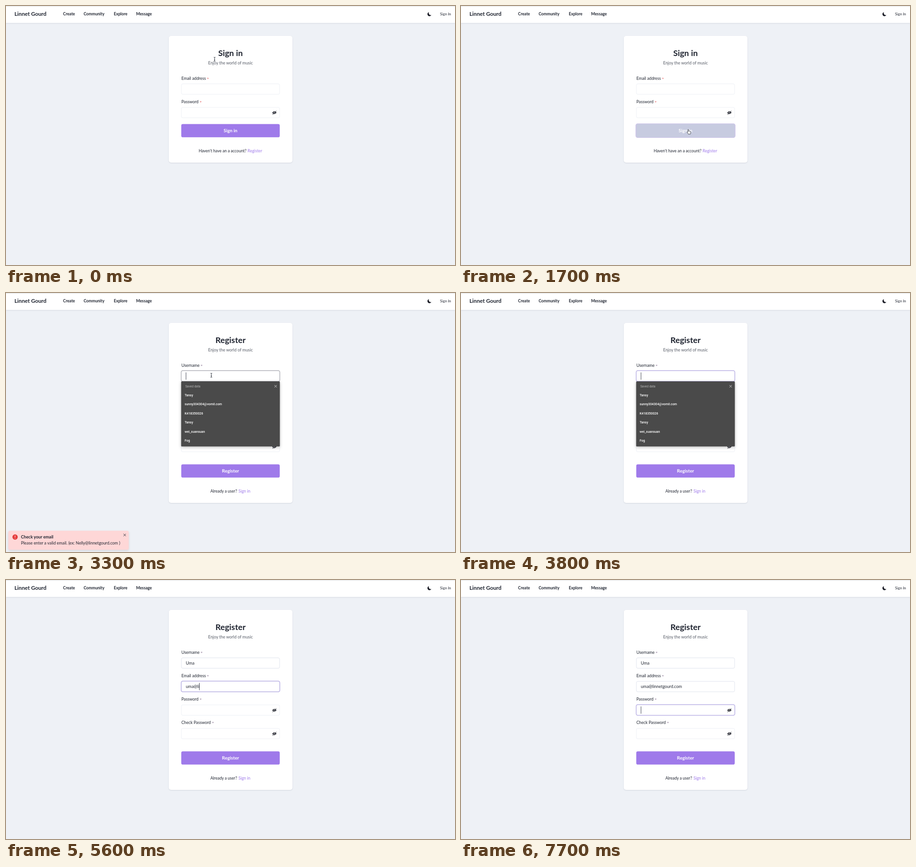
These frames come from a looping animation (960x554 px, 8000 ms). An HTML page:

```html
<!DOCTYPE html>
<html lang="en">
<head>
<meta charset="utf-8">
<title>Sign in and register</title>
<style>
  html, body { margin: 0; width: 100%; height: 100%; overflow: hidden; background: #eef1f6; }
  svg { display: block; width: 960px; height: 554px; font-family: Lato, "Open Sans", sans-serif; font-size: 8.75px; fill: #1f2430; }
  .b { font-weight: 700; }
  .mid { text-anchor: middle; }
  .title { font-size: 17.8px; }
  .sub { font-size: 8.9px; fill: #565b66; }
  .value { font-size: 8.95px; }
  .foot { font-size: 8.55px; }
  .link { fill: #9f7aea; }
  .btn { font-size: 10px; fill: #fff; }
  .star { font-family: "Open Sans", sans-serif; font-size: 8px; }
  .menu { font: 500 6.85px Roboto, sans-serif; fill: #fff; }
  .card { fill: #fff; filter: drop-shadow(0 1px 1px rgba(30, 40, 70, .13)); }
  .line { fill: none; stroke: #1f2430; }
</style>
</head>
<body>
<svg id="stage" viewBox="0 0 960 554" xmlns="http://www.w3.org/2000/svg">
  <defs>
    <g id="eye">
      <path d="M-4.6 .2Q0-6.2 4.6-.2Q0 6.2-4.6 .2Z" fill="#171923"/>
      <circle r="1.8" fill="none" stroke="#fff" stroke-width=".6"/>
      <path d="M-4 3.4L3.6-4.2" stroke="#fff" stroke-width=".8"/>
      <path d="M-3.7 3.9L3.9-3.7" stroke="#171923" stroke-linecap="round"/>
    </g>
  </defs>

  <rect width="960" height="554" fill="#eef1f6"/>
  <rect width="960" height="36.3" class="card"/>
  <rect width="960" height="1" fill="#dfe0e3"/>
  <g class="b">
    <text x="18" y="21.2" font-size="11.75">Linnet Gourd</text>
    <g font-size="8.6">
      <text x="122" y="20.3">Create</text>
      <text x="166" y="20.3">Community</text>
      <text x="230.5" y="20.3">Explore</text>
      <text x="278.3" y="20.3">Message</text>
    </g>
  </g>
  <path d="M904.2 13.2A4.4 4.4 0 1 0 909.4 19.3A4.4 4.4 0 0 1 904.2 13.2Z" fill="#171923"/>
  <text x="928" y="20.3" font-size="8">Sign In</text>

  <g id="page"></g>

  <g id="menu"></g>

  <g id="toast">
    <rect x="5" y="508.5" width="257.5" height="40.7" rx="3.5" fill="#fed7d7" style="filter:drop-shadow(0 2px 2px rgba(0,0,0,.11))"/>
    <circle cx="19.4" cy="522" r="5.7" fill="#e53e3e"/>
    <path d="M19.4 518.8V522.6M19.4 524V525.2" stroke="#fed7d7" stroke-width="1.2"/>
    <text x="32" y="524.8" class="b" font-size="9.1">Check your email</text>
    <text x="32" y="538.4" font-size="8.85">Please enter a valid email. (ex: Nelly@linnetgourd.com )</text>
    <path d="M251.2 515l5.2 5.2m0-5.2l-5.2 5.2" class="line" stroke-width=".9"/>
  </g>

  <g id="cursor">
    <path id="beam" d="M-1.8-4.5Q0-4.5 0-3.4Q0-4.5 1.8-4.5M0-3.4V3.4M-1.8 4.5Q0 4.5 0 3.4Q0 4.5 1.8 4.5M-1 1.4H1" class="line" stroke-width=".9"/>
    <path id="hand" d="M-1.8 1V-4Q-1.8-4.9-.9-4.9Q0-4.9 0-4V-1.3Q1.4-1.8 1.6-.9Q2.8-1.3 3-.4Q4.2-.5 4.2 .7V2.3Q4.2 3.6 3.3 5H-1Q-1.6 3.8-3.4 1.8Q-4 .8-3.3 .4Q-2.6 .1-1.8 1Z" fill="#fff" stroke="#20242c" stroke-width=".8" stroke-linejoin="round"/>
    <path id="arrow" d="M-3-5V4L-.9 2L.6 5.3L2 4.7L.6 1.5H3.5Z" fill="#111" stroke="#fff" stroke-width=".7"/>
  </g>
</svg>

<script>
const LOOP = 8000, STEP = 100;
const SWITCH = 2600, CLICK = 900;
const PITCH = 50.3;
const $ = id => document.getElementById(id);

const path = [
  [0, 446, 114], [100, 447, 118], [400, 460, 200], [700, 478, 262], [900, 486, 268],
  [1700, 487, 269], [1900, 488, 271], [2200, 525, 305], [2400, 533.5, 314],
  [2600, 533.5, 314], [3000, 441, 178], [3200, 439, 176]
];
const userKeys = [[3900, 'U'], [4100, 'Um'], [4300, 'Uma']];
const mailKeys = [
  [4800, 'u'], [4900, 'um'], [5000, 'uma'], [5300, 'uma@'], [5500, 'uma@l'], [5600, 'uma@li'],
  [5800, 'uma@lin'], [5900, 'uma@linn'], [6100, 'uma@linne'], [6300, 'uma@linnet'],
  [6400, 'uma@linnetgo'], [6500, 'uma@linnetgourd'], [6700, 'uma@linnetgourd.'],
  [6800, 'uma@linnetgourd.c'], [6900, 'uma@linnetgourd.com']
];
const saved = ['Tansy', 'sunny304304@vomil.com', 'K418350026', 'Tansy', 'wei_suansuan', 'Fog'];

const typed = (keys, t) => keys.reduce((s, [at, text]) => t >= at ? text : s, '');

// Linear value between [time, ...values] rows
function tween(rows, t) {
  const i = rows.findIndex(r => r[0] > t);
  if (i < 0) return rows[rows.length - 1].slice(1);
  if (i === 0) return rows[0].slice(1);
  const a = rows[i - 1], b = rows[i], k = (t - a[0]) / (b[0] - a[0]);
  return a.slice(1).map((v, n) => v + (b[n + 1] - v) * k);
}

const text = (x, y, cls, s) => `<text x="${x}" y="${y}" class="${cls}">${s}</text>`;

function field(row, label, { value = '', eye, focus, star }) {
  const y = 166.5 + row * PITCH;
  const ring = focus
    ? `<rect x="374.5" y="${y - .5}" width="211" height="23" rx="3.5" fill="none" stroke="${focus}" stroke-width="1.5"/>` : '';
  return `<text x="375" y="${y - 9}">${label} <tspan class="star" fill="${star}">*</tspan></text>
    <rect x="375" y="${y}" width="210" height="22.3" rx="3" fill="#fff" stroke="${value ? '#d9dee9' : '#e9edf3'}" stroke-width=".8"/>${ring}
    <text x="384.6" y="${y + 14.3}" class="value" data-row="${row}">${value}</text>
    ${eye ? `<use href="#eye" x="573.8" y="${y + 11.4}"/>` : ''}`;
}

function frame(height, title, fields, btnY, fill, ring, foot) {
  return `<rect x="348" y="64" width="264.5" height="${height}" rx="5" class="card"/>
    ${text(480, 106.5, 'mid b title', title)}${text(480, 125.3, 'mid sub', 'Enjoy the world of music')}
    ${fields}
    ${ring ? `<rect x="373.2" y="${btnY - 1.7}" width="213.6" height="30.8" rx="4.5" fill="${ring}"/>` : ''}
    <rect x="374.7" y="${btnY - .4}" width="210.6" height="28.2" rx="3.4" fill="${fill}"/>
    ${text(480, btnY + 17, 'mid b btn', title)}${foot}`;
}

function signIn(t, overBtn, overLink) {
  const star = '#e87070';
  const ring = t < CLICK ? '' : overBtn ? '#cdc5e9' : '#d3c5f5';
  const foot = text(412, 312.8, 'foot', "Haven't have an a account?")
    + text(516.5, 312.8, 'link', 'Register')
    + (overLink ? '<path d="M516.5 314.2H548" stroke="#9f7aea" stroke-width=".7"/>' : '');
  return frame(271, 'Sign in',
    field(0, 'Email address', { star }) + field(1, 'Password', { star, eye: true }),
    253, overBtn ? '#c7cbe0' : '#9f7aea', ring, foot);
}

function register(t, row) {
  const star = '#94809c';
  const focus = r => r === row ? (t < 3800 ? '#b4b4ba' : '#bdb4e6') : '';
  const popup = t >= 4100 && t < 4500
    ? '<path d="M369.5 195V230Q370 238.5 378 238.5H582Q589.5 238.5 589.5 230V195" fill="none" stroke="#e9eaee"/>' : '';
  const fields =
    field(0, 'Username', { star, focus: focus(0), value: typed(userKeys, t) }) +
    field(1, 'Email address', { star, focus: focus(1), value: typed(mailKeys, t) }) +
    field(2, 'Password', { star, focus: focus(2), eye: true }) +
    field(3, 'Check Password', { star, eye: true });
  const foot = text(437, 427, 'foot', 'Already a user?') + text(497, 427, 'link', 'Sign in');
  return frame(385, 'Register', fields + popup, 367, '#9f7aea', '', foot);
}

function menu(t) {
  if (t < 3100 || t >= 4100) return '';
  const items = t < 3900 ? saved : ['Uma'];
  const h = items.length > 1 ? 139.3 : 41;
  return `<rect x="374.5" y="189" width="211" height="${h}" rx="1.5" fill="#4a4a4a" style="filter:drop-shadow(0 2px 3px rgba(0,0,0,.25))"/>
    <text x="383.2" y="201.8" class="menu" style="font-size:6.6px;font-weight:400;fill:#b5b5b5">Saved data</text>
    <path d="M574 197l5 5m0-5l-5 5" stroke="#ddd" stroke-width=".9"/>`
    + items.map((s, i) => text(382, 220.8 + i * 19.45, 'menu', s)).join('');
}

function caret(t, row) {
  if (row < 0) return;
  const value = document.querySelector(`[data-row="${row}"]`);
  const len = value.textContent ? value.getComputedTextLength() : 0;
  const line = document.createElementNS('http://www.w3.org/2000/svg', 'path');
  line.setAttribute('d', `M${384.9 + len} ${169.8 + row * PITCH}v15.6`);
  line.setAttribute('stroke', '#2d3340');
  line.setAttribute('stroke-width', .9);
  line.setAttribute('opacity', t >= 7400 && t < 7600 ? 0 : t === 7600 ? .5 : 1);
  $('page').append(line);
}

function render(t) {
  const [x, y] = tween(path, t);
  const first = t < SWITCH;
  const inside = (x0, y0, x1, y1) => x > x0 && x < x1 && y > y0 && y < y1;
  const overBtn = first && inside(375, 253, 585, 280.4);
  const overLink = first && inside(516, 304, 549, 319);
  const overText = y < 130 || inside(375, 166, 585, 189) || inside(375, 217, 585, 239);
  const row = t < 3000 ? -1 : t < 4600 ? 0 : t < 7100 ? 1 : 2;

  $('page').innerHTML = first ? signIn(t, overBtn, overLink) : register(t, row);
  caret(t, row);
  $('menu').innerHTML = menu(t);

  const [drop, alpha] = tween([
    [1700, 46, 0], [1800, 26, .55], [1900, 6, .92], [2000, 0, 1],
    [3400, 0, 1], [3500, 0, .65], [3600, 0, .25], [3700, 0, 0]
  ], t);
  $('toast').setAttribute('transform', `translate(0 ${drop})`);
  $('toast').setAttribute('opacity', alpha);

  const kind = overBtn || overLink ? 'hand' : overText ? 'beam' : 'arrow';
  for (const id of ['hand', 'beam', 'arrow']) $(id).style.display = id === kind ? '' : 'none';
  $('cursor').setAttribute('transform', `translate(${x} ${y})`);
  $('cursor').style.display = t < 3800 ? '' : 'none';
}

const start = performance.now();
let last = -1;
function tick() {
  const t = Math.floor((performance.now() - start) % LOOP / STEP) * STEP;
  if (t !== last) render(last = t);
  requestAnimationFrame(tick);
}
tick();
</script>
</body>
</html>
```
